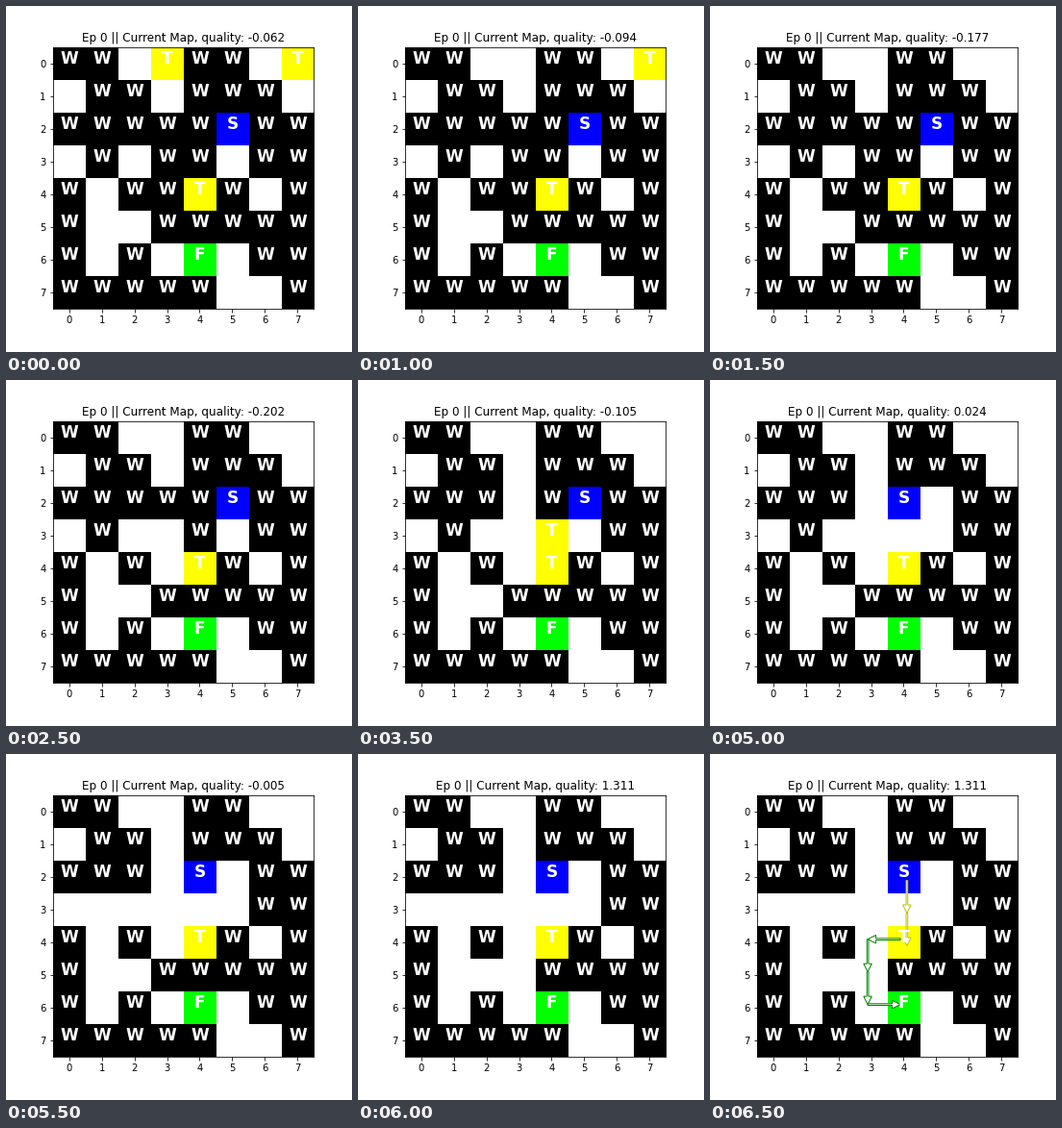
A matplotlib script for the animation above (8000 ms loop, 360 by 360 pixels).

```python
import matplotlib.pyplot as plt
import numpy as np
from matplotlib.animation import FuncAnimation

SIZE, DPI = 360, 72
FRAMES, INTERVAL = 16, 500

START_MAP = [
    "WW TWW T",
    " WW WWW ",
    "WWWWWSWW",
    " W WW WW",
    "W WWTW W",
    "W  WWWWW",
    "W W F WW",
    "WWWWW  W",
]
# row, column, new tile, quality after the edit
EDITS = [
    (0, 3, " ", -0.094),
    (0, 7, " ", -0.177),
    (3, 3, " ", -0.189),
    (4, 3, " ", -0.202),
    (2, 3, " ", -0.187),
    (3, 4, "T", -0.105),
    (2, 5, " ", -0.214),
    (3, 4, " ", -0.293),
    (2, 4, "S", 0.024),
    (3, 1, " ", -0.005),
    (5, 3, " ", 1.311),
]
START_QUALITY = -0.062
PATH_FRAME = 13
COLORS = {
    "W": (0, 0, 0),
    " ": (255, 255, 255),
    "T": (255, 255, 0),
    "S": (0, 0, 255),
    "F": (0, 255, 0),
}

fig = plt.figure(figsize=(SIZE / DPI, SIZE / DPI), dpi=DPI, facecolor="white")
ax = fig.add_axes([0.135, 0.125, 0.755, 0.755])
image = ax.imshow(np.full((8, 8, 3), 255, dtype=np.uint8))
ax.set_xticks(range(8))
ax.set_yticks(range(8))
ax.tick_params(labelsize=10)
title = ax.set_title("", fontsize=12)
labels = [
    [ax.text(x, y, "", color="white", size=17, weight="bold", ha="center")
     for x in range(8)]
    for y in range(8)
]


def draw_path(points, shift, color):
    """Chain of one-tile arrows through (x, y) tiles."""
    arrows = []
    for (x0, y0), (x1, y1) in zip(points, points[1:]):
        arrows.append(ax.arrow(
            x0 + shift, y0 + shift, x1 - x0, y1 - y0,
            width=0.05, head_width=0.25, head_length=0.25,
            length_includes_head=True, fc="white", ec=color, lw=1))
    return arrows


path = draw_path([(4, 2), (4, 3), (4, 4)], 0.1, "y")
path += draw_path([(4, 4), (3, 4), (3, 5), (3, 6), (4, 6)], -0.1, "g")


def update(frame):
    tiles = [list(row) for row in START_MAP]
    quality = START_QUALITY
    for row, col, tile, quality in EDITS[:max(0, frame - 1)]:
        tiles[row][col] = tile

    image.set_data(np.array([[COLORS[t] for t in row] for row in tiles],
                            dtype=np.uint8))
    for label_row, row in zip(labels, tiles):
        for label, tile in zip(label_row, row):
            label.set_text(tile.strip())
    title.set_text(f"Ep 0 || Current Map, quality: {quality:.3f}")
    for arrow in path:
        arrow.set_visible(frame >= PATH_FRAME)
    return []


anim = FuncAnimation(fig, update, frames=FRAMES, interval=INTERVAL,
                     init_func=lambda: update(0), repeat=True, repeat_delay=0)
plt.show()
```
